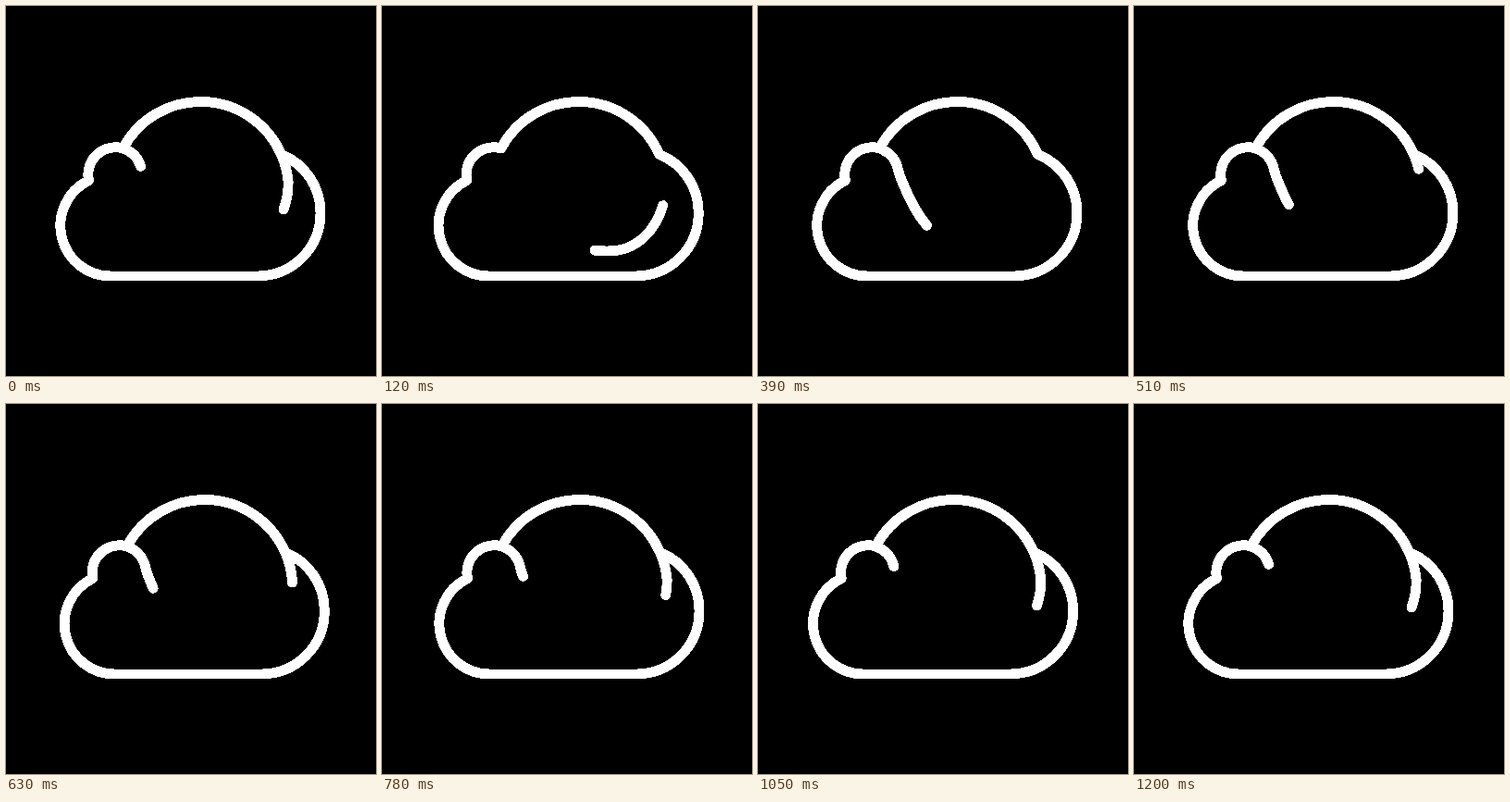
An HTML page that plays this animation: 400 px wide and 400 px high, repeating every 2260 ms.

```html
<!DOCTYPE html>
<html lang="en">
<head>
<meta charset="utf-8">
<title>Cloud</title>
<style>
  html, body { margin: 0; height: 100%; overflow: hidden; background: #000; }
  svg { display: block; width: 100%; height: 100%; }
  path { fill: none; stroke: #fff; stroke-width: 10; stroke-linecap: round; stroke-linejoin: round; }
</style>
</head>
<body>
<svg viewBox="0 0 400 400">
  <!-- Hard, unsmoothed edges -->
  <filter id="hard" filterUnits="userSpaceOnUse" x="0" y="0" width="400" height="400">
    <feComponentTransfer><feFuncA type="linear" slope="12"/></feComponentTransfer>
  </filter>
  <g filter="url(#hard)">
    <g id="cloud">
      <path d="M89.5 188.5 A29.5 29.5 0 0 1 126.5 154 A95 95 0 0 1 297.5 160.3
               A68 68 0 0 1 340 224 A68 68 0 0 1 272 292 H114.5 A54.5 54.5 0 0 1 89.5 188.5 Z"/>
      <path id="swirl" stroke-dasharray="97 223"
            d="M297.5 160.3 A95 95 0 0 1 305.1 190 C306 218 288 266 240 265
               C190 265 168 232 151 190 Q148 183 146.5 177 A29.5 29.5 0 0 0 126.5 154"/>
    </g>
  </g>
</svg>
<script>
  const LOOP = 2260, MOVE = 1200, STEP = 30, PERIOD = 320, START = 35.5;
  const cloud = document.getElementById('cloud');
  const swirl = document.getElementById('swirl');

  const bezier = (a, b, s) => 3 * (1 - s) ** 2 * s * a + 3 * (1 - s) * s * s * b + s ** 3;

  // Cubic-bezier easing, solved by bisection
  function ease(x) {
    let lo = 0, hi = 1;
    for (let i = 0; i < 24; i++) {
      const mid = (lo + hi) / 2;
      if (bezier(0.22, 0.145, mid) < x) lo = mid; else hi = mid;
    }
    return bezier(0.54, 0.975, hi);
  }

  function draw(now) {
    const time = Math.floor((now % LOOP) / STEP) * STEP;
    const t = Math.min(time / MOVE, 1);
    const sway = 5 * Math.sin(Math.PI * (1 - (1 - t) ** 1.5));
    cloud.setAttribute('transform', `translate(${sway.toFixed(3)} 0)`);
    swirl.setAttribute('stroke-dashoffset', START + PERIOD * (1 - ease(t)));
  }

  const begin = performance.now();
  function tick() {
    draw(performance.now() - begin);
    requestAnimationFrame(tick);
  }
  tick();
</script>
</body>
</html>
```
